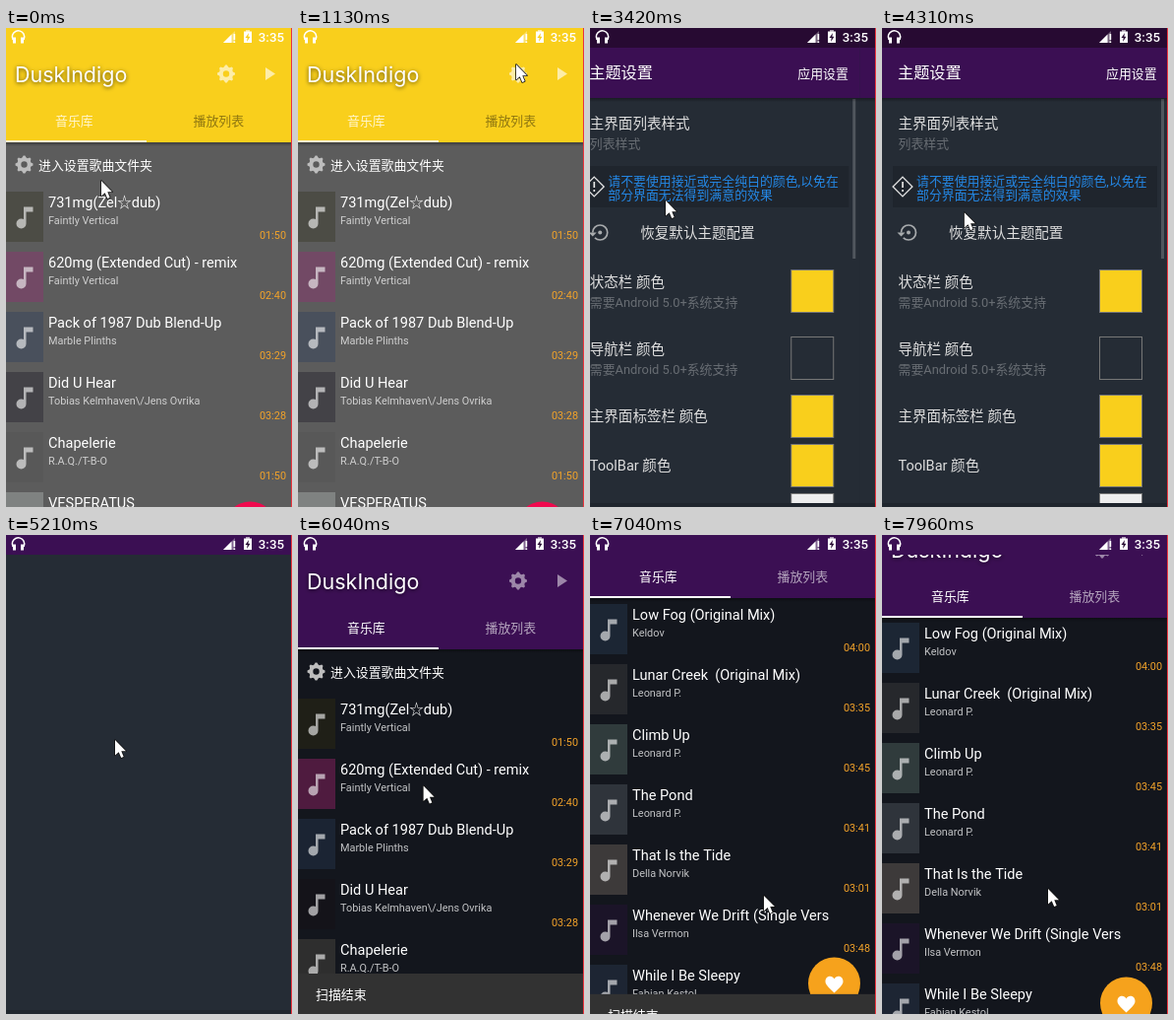
These frames come from a looping animation (291x486 px, 8 s). An HTML page with a canvas:

```html
<!DOCTYPE html>
<html lang="zh-CN">
<head>
<meta charset="utf-8">
<title>Music player theme reset</title>
<style>
html, body { margin: 0; width: 100%; height: 100%; overflow: hidden; background: #13161d; }
canvas { display: block; width: 291px; height: 486px; }
</style>
</head>
<body>
<canvas id="stage"></canvas>
<script>
const W = 291, H = 486, LOOP = 8000, PITCH = 60.9, TAU = Math.PI * 2;
const SANS = 'Roboto, "Noto Sans CJK SC", "Noto Sans CJK", sans-serif';
const canvas = document.getElementById('stage');
const c = canvas.getContext('2d');
const dpr = window.devicePixelRatio || 1;
canvas.width = W * dpr;
canvas.height = H * dpr;

const YELLOW = '#f9cf1c', PURPLE = '#3b0f53', STATUS = '#270a32', BODY = '#252c35', NAV = '#1f252d';
const LIGHT = { bar: YELLOW, list: '#5c5c5c', fab: '#f00a4e', dim: '#8f7711', tab: '#fff6cf', icon: 'rgba(255,255,255,.62)', sub: '#cfcfcf', haze: .2 };
const DARK = { bar: PURPLE, list: '#13161d', fab: '#f6a21c', dim: '#b5a5be', tab: '#fff', icon: 'rgba(255,255,255,.5)', sub: '#c2c3c5', haze: 0 };

// title, artist, length, cover colour
const SONGS = [
  ['731mg(Zel☆dub)', 'Faintly Vertical', '01:50', '#1f1f17'],
  ['620mg (Extended Cut) - remix', 'Faintly Vertical', '02:40', '#4f1b3f'],
  ['Pack of 1987 Dub Blend-Up', 'Marble Plinths', '03:29', '#1b2433'],
  ['Did U Hear', 'Tobias Kelmhaven\\/Jens Ovrika', '03:28', '#141319'],
  ['Chapelerie', 'R.A.Q./T-B-O', '01:50', '#2e2e2e'],
  ['VESPERATUS', 'D.J.Ovelo Vs TAX VOLIDIKER', '01:49', '#5f6362'],
  ['Kettles from Autumn', 'Umbral Choir', '04:47', '#352e28'],
  ['Low Fog (Original Mix)', 'Keldov', '04:00', '#1c2634'],
  ['Lunar Creek  (Original Mix)', 'Leonard P.', '03:35', '#26282c'],
  ['Climb Up', 'Leonard P.', '03:45', '#303b3c'],
  ['The Pond', 'Leonard P.', '03:41', '#2f343b'],
  ['That Is the Tide', 'Della Norvik', '03:01', '#3d3a3a'],
  ['Whenever We Drift (Single Vers', 'Ilsa Vermon', '03:48', '#1b1428'],
  ['While I Be Sleepy', 'Fabian Kestol', '03:52', '#1d2533']
];

// pointer moves: start, end, where it arrives
const MOVES = [
  [370, 620, 134, 214], [620, 1130, 222, 37],
  [2430, 2780, 77, 175],
  [3820, 4000, 86, 117], [4000, 4430, 83, 214], [4610, 4670, 111, 208],
  [5890, 6380, 165, 359], [6450, 6620, 168, 181],
  [6680, 7040, 177, 366], [7040, 7240, 170, 341], [7540, 7960, 169, 359]
];

const progress = (t, from, to) => Math.min(1, Math.max(0, (t - from) / (to - from)));
const easeOut = u => 1 - (1 - u) ** 2;
const slideIn = (t, from, to) => -W * (1 - easeOut(progress(t, from, to)));

function pointerAt(t) {
  let x = 97, y = 155;
  for (const [from, to, endX, endY] of MOVES) {
    const u = progress(t, from, to);
    x += (endX - x) * u;
    y += (endY - y) * u;
  }
  return [x, y];
}

// dragging first hides the title bar, then scrolls the list
function layoutAt(t) {
  const drag = 178 * progress(t, 6450, 6620);
  const fling = 345 * easeOut(progress(t, 6680, 7060));
  return {
    bar: 20 * progress(t, 7540, 7960) - Math.min(52, drag),
    scroll: Math.max(0, drag - 52) + fling,
    snack: H - 41 * (easeOut(progress(t, 5390, 5560)) - progress(t, 6980, 7100))
  };
}

function rect(x, y, w, h, color) {
  c.fillStyle = color;
  c.fillRect(x, y, w, h);
}

function disc(x, y, r, color) {
  c.fillStyle = color;
  c.beginPath();
  c.arc(x, y, r, 0, TAU);
  c.fill();
}

function arc(x, y, r, from, to, color, width) {
  c.strokeStyle = color;
  c.lineWidth = width;
  c.beginPath();
  c.arc(x, y, r, from, to);
  c.stroke();
}

function polygon(points, color) {
  c.fillStyle = color;
  c.beginPath();
  points.forEach(p => c.lineTo(...p));
  c.closePath();
  c.fill();
}

// y is the middle of the capitals
function text(str, x, y, size, color, align = 'left', font = SANS, weight = 400) {
  c.font = `${weight} ${size}px ${font}`;
  c.textAlign = align;
  c.fillStyle = color;
  c.fillText(str, x, y + size * .36);
}

function shadow(y) {
  const g = c.createLinearGradient(0, y, 0, y + 4);
  g.addColorStop(0, 'rgba(0,0,0,.35)');
  g.addColorStop(1, 'rgba(0,0,0,0)');
  rect(0, y, W, 4, g);
}

function gear(x, y, color) {
  c.fillStyle = color;
  c.beginPath();
  for (let i = 0; i < 32; i++) {
    const r = i % 4 < 2 ? 9 : 7.2, a = (i - .5) * TAU / 32;
    c.lineTo(x + r * Math.cos(a), y + r * Math.sin(a));
  }
  c.closePath();
  c.moveTo(x + 3.2, y);
  c.arc(x, y, 3.2, 0, TAU);
  c.fill('evenodd');
}

function play(x, y, color) {
  polygon([[x - 4, y - 6.5], [x + 6, y], [x - 4, y + 6.5]], color);
}

function note(x, y, color) {
  c.fillStyle = color;
  c.beginPath();
  c.arc(x - 3.5, y + 6, 5, 0, TAU);
  c.rect(x - 1, y - 11, 2.5, 17);
  c.rect(x + 1.5, y - 11, 7, 5);
  c.fill();
}

function heart(x, y) {
  c.fillStyle = '#fff';
  c.beginPath();
  c.moveTo(x, y + 8.5);
  for (const side of [-1, 1]) {
    c.moveTo(x, y + 8.5);
    c.bezierCurveTo(x + side * 6, y + 3, x + side * 9, y, x + side * 9, y - 3);
    c.bezierCurveTo(x + side * 9, y - 9, x + side * 2, y - 10, x, y - 5.5);
  }
  c.fill();
}

function statusIcons(bar) {
  arc(12.5, 9, 6.2, Math.PI * .85, Math.PI * 2.15, '#fff', 1.5);
  for (const x of [7, 15]) rect(x, 9.5, 3, 6, '#fff');
  polygon([[221, 15], [233, 3], [233, 15]], 'rgba(255,255,255,.35)');
  polygon([[221, 15], [229.5, 6.5], [229.5, 15]], '#fff');
  rect(231.5, 6, 1.7, 6, '#fff');
  rect(231.5, 13.5, 1.7, 1.5, '#fff');
  rect(244, 2, 4, 2, 'rgba(255,255,255,.6)');
  rect(242, 3.5, 8, 11.5, '#fff');
  polygon([[247, 5], [243.5, 10], [245.7, 10], [245, 14], [248.5, 8.7], [246.4, 8.7]], bar);
  text('3:35', 283, 9.3, 13.3, '#fff', 'right', SANS, 500);
}

function song([title, artist, length, cover], y, theme) {
  rect(0, y - 11, 38, 51, cover);
  rect(0, y - 11, 38, 51, `rgba(255,255,255,${theme.haze})`);
  note(19, y + 15.5, 'rgba(255,255,255,.6)');
  text(title, 43, y, 14.55, '#fff');
  text(artist, 43, y + 18, 10.9, theme.sub);
  text(length, 285, y + 33.5, 10.9, '#f2a32a', 'right');
}

function mainScreen(t, theme) {
  const { bar, scroll, snack } = layoutAt(t);
  const top = bar - scroll;
  rect(0, 0, W, H, theme.list);
  gear(18.5, 138.5 + top, '#bdbdbd');
  text('进入设置歌曲文件夹', 33, 139 + top, 12.9, '#fff');
  SONGS.forEach((s, i) => song(s, Math.round(177 + i * PITCH + top), theme));
  disc(248.5, 508.5 + bar, 26.5, 'rgba(0,0,0,.25)');
  disc(248.5, 507 + bar, 26.5, theme.fab);
  heart(248.5, 508 + bar);

  shadow(116 + bar);
  rect(0, 0, W, 116 + bar, theme.bar);
  c.save();
  c.shadowColor = 'rgba(0,0,0,.65)';
  c.shadowBlur = 4 * dpr;
  c.shadowOffsetY = dpr;
  text('DuskIndigo', 9, 47 + bar, 21.5, '#fff', 'left', 'Inter, sans-serif');
  c.restore();
  const ripple = progress(t, 2090, 2370);
  if (theme === LIGHT && ripple) disc(222.5, 45, 8 + 24 * ripple, 'rgba(255,255,255,.16)');
  gear(224, 46.5 + bar, theme.icon);
  play(268, 46.5 + bar, theme.icon);
  text('音乐库', 50, 94.5 + bar, 12.9, theme.tab);
  text('播放列表', 190.5, 94.5 + bar, 12.9, theme.dim);
  rect(0, 114 + bar, 143, 2, theme.tab);
  rect(0, 0, W, 20, theme.bar);

  if (theme === DARK) {
    rect(0, snack, W, 41, '#323232');
    text('扫描结束', 18, snack + 21.5, 12.9, '#fff');
  }
}

function panel(x, title, drawBody) {
  c.save();
  c.translate(x, 0);
  rect(0, 0, W, H, BODY);
  drawBody();
  rect(0, 482, W, 4, NAV);
  shadow(71);
  rect(0, 0, W, 71, PURPLE);
  rect(0, 0, W, 20, STATUS);
  text(title, 16, 45.5, 16.2, '#fff');
  if (drawBody === themeBody) text('应用设置', 228, 46.5, 12.9, '#fff');
  c.restore();
}

function settingsBody() {
  ['通用设置', '音乐目录设置', '主题设置', '关于软件'].forEach((s, i) => text(s, 16.5, 97 + i * 42, 14.55, '#dedede'));
}

function warning(x, y) {
  c.save();
  c.translate(x, y);
  c.rotate(Math.PI / 4);
  c.strokeStyle = '#e4e4e4';
  c.lineWidth = 1.3;
  c.strokeRect(-7, -7, 14, 14);
  c.restore();
  rect(x - .8, y - 5, 1.7, 6, '#e4e4e4');
  rect(x - .8, y + 3, 1.7, 2, '#e4e4e4');
}

function restoreIcon(x, y, color) {
  arc(x, y, 7.5, Math.PI, Math.PI * 2.75, color, 1.7);
  polygon([[x - 11.5, y], [x - 3.5, y], [x - 7.5, y + 4]], color);
  disc(x, y, 2, color);
}

function themeBody() {
  const ink = '#dedede', faint = '#686d73', blue = '#2488e6';
  text('主界面列表样式', 16.5, 97, 14.55, ink);
  text('列表样式', 16.5, 117, 12.9, faint);
  rect(11, 140, 269, 42, NAV);
  warning(21, 161);
  text('请不要使用接近或完全纯白的颜色,以免在', 35, 155, 12.9, blue);
  text('部分界面无法得到满意的效果', 35, 169.5, 12.9, blue);
  restoreIcon(27, 207.5, '#a8abad');
  text('恢复默认主题配置', 68, 208, 14.55, ink);

  let top = 233;
  const colorRow = (label, color, hint) => {
    const height = hint ? 68 : 50, middle = top + height / 2;
    text(label, 16.5, middle - (hint ? 9 : 0), 14.55, ink);
    if (hint) text(hint, 16.5, middle + 11, 12.9, faint);
    rect(221, middle - 22, 44, 44, '#777');
    rect(222, middle - 21, 42, 42, color);
    top += height;
  };
  colorRow('状态栏 颜色', YELLOW, '需要Android 5.0+系统支持');
  colorRow('导航栏 颜色', BODY, '需要Android 5.0+系统支持');
  colorRow('主界面标签栏 颜色', YELLOW);
  colorRow('ToolBar 颜色', YELLOW);
  colorRow('', '#eee');
  rect(284, 72, 3, 162, '#50565d');
}

function blankScreen(alpha) {
  c.globalAlpha = alpha;
  rect(0, 0, W, H, BODY);
  rect(0, 482, W, 4, NAV);
  rect(0, 0, W, 20, PURPLE);
  c.globalAlpha = 1;
}

function pointer(t) {
  const arrow = new Path2D('M0 0V15.5L3.7 12.2 6.2 18 8.7 16.9 6.3 11.2H11z');
  c.save();
  c.translate(...pointerAt(t));
  c.lineJoin = 'round';
  c.lineWidth = 1.6;
  c.strokeStyle = '#111';
  c.stroke(arrow);
  c.fillStyle = '#fff';
  c.fill(arrow);
  c.restore();
}

function draw(t) {
  c.setTransform(dpr, 0, 0, dpr, 0, 0);
  if (t < 5210) {
    mainScreen(t, LIGHT);
    panel(slideIn(t, 2120, 2630), '设置', settingsBody);
    panel(slideIn(t, 3250, 3475), '主题设置', themeBody);
  } else {
    mainScreen(t, DARK);
    blankScreen(1 - progress(t, 5330, 5450));
  }
  statusIcons(t < 2370 ? YELLOW : STATUS);
  rect(290, 0, 1, H, '#e8323c');
  pointer(t);
}

const start = performance.now();
function tick() {
  draw((performance.now() - start) % LOOP);
  requestAnimationFrame(tick);
}
tick();
</script>
</body>
</html>
```
